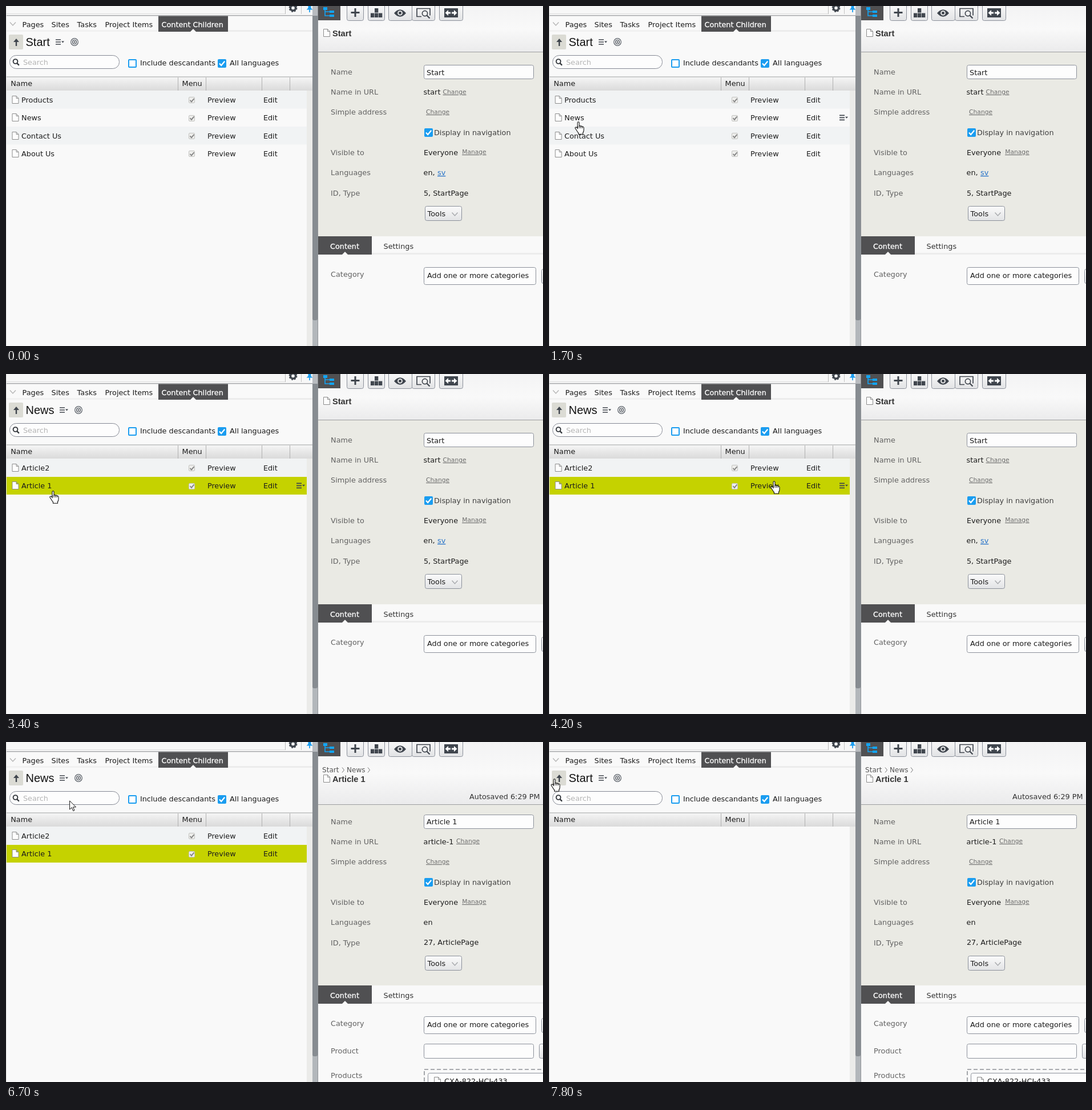
An HTML page for the animation above (8 s loop, 941 px wide and 595 px high).

```html
<!DOCTYPE html>
<html lang="en">
<head>
<meta charset="utf-8">
<title>Content children</title>
<style>
html, body { margin: 0; width: 100%; height: 100%; overflow: hidden; background: #f9f9f9; }
svg { display: block; }
text { font: 12.8px "DejaVu Sans", Verdana, sans-serif; white-space: pre; }
.title { font: 20px "Liberation Sans", Arial, sans-serif; }
.head { font: bold 14.6px "Liberation Sans", Arial, sans-serif; }
.crumb { font-size: 12px; }
.link { font-size: 10.7px; text-decoration: underline; }
.on { stroke: #fff; stroke-width: .3px; }
</style>
</head>
<body>
<svg id="stage" width="941" height="595" viewBox="0 0 941 595">
<defs>
  <linearGradient id="bar" x2="0" y2="1"><stop stop-color="#f6f6f6"/><stop offset="1" stop-color="#dadada"/></linearGradient>
  <linearGradient id="top" x2="0" y2="1"><stop stop-color="#f3f3f4"/><stop offset=".5" stop-color="#f9f9f9"/><stop offset="1" stop-color="#ebebec"/></linearGradient>
  <linearGradient id="btn" x2="0" y2="1"><stop stop-color="#fbfbfb"/><stop offset="1" stop-color="#e2e3e5"/></linearGradient>
</defs>
</svg>
<script>
const LOOP = 8000, STEP = 100, ROW = 31.35, LIST_TOP = 148.3;
const INK = '#1c1c1c', LABEL = '#626262', DARK = '#505052', ICON = '#40464e', BLUE = '#1b9df0';
const stage = document.getElementById('stage');

const rect = (x, y, w, h, fill, more = '') =>
  `<rect x="${x}" y="${y}" width="${w}" height="${h}" fill="${fill}" ${more}/>`;
const path = (d, stroke, width = 1, fill = 'none') =>
  `<path d="${d}" stroke="${stroke}" stroke-width="${width}" fill="${fill}"/>`;
const text = (x, y, str, fill = INK, cls = '') =>
  `<text x="${x - .4}" y="${Math.round(y)}" fill="${fill}" class="${cls}">${str}</text>`;
const group = (id, body, more = '') => `<g id="${id}" ${more}>${body}</g>`;
const box = (x, y, w, h, fill = '#fdfdfd') =>
  rect(x + .5, y + .5, w - 1, h - 1, fill, 'rx="3" stroke="#8b909a"');
const link = (x, y, str) => text(x, y, str, '#6c6c6c', 'link');

const page = (x, y) => path(`M${x + .5} ${y + .5}h7l4 4v9h-11zm7 0v4h4`, '#8c8c8c', 1, '#fdfdfd');
const menuIcon = (x, y) =>
  path(`M${x} ${y - 4}h9m-9 4h9m-9 4h9`, ICON, 1.7) + path(`M${x + 10} ${y - 1.5}h5l-2.5 3z`, 'none', 0, ICON);
const checked = (x, y) =>
  rect(x, y, 15, 15, BLUE, 'rx="2"') + path(`M${x + 3} ${y + 7.5}l3.2 3.5 6-7.3`, '#fff', 2.2);
const tab = (x, y, w, h, str, tx) =>
  rect(x, y, w, h, DARK) +
  path(`M${x + w / 2 - 5} ${y + h}l5-5 5 5z`, 'none', 0, '#f9f9f9') +
  text(tx, y + h / 2 + 5.5, str, '#fff', 'on');
const chevron = (x, y, color) => path(`M${x - 5} ${y - 2.5}l5 5.5 5-5.5`, color, 1.5);

function listRow(name, i) {
  const y = LIST_TOP + i * ROW, base = y + 20.6;
  return (i % 2 ? '' : rect(1, y, 526, ROW, '#f1f3f4')) +
    group(`bg-${name.replace(/\W/g, '')}`, rect(1, 180, 526, 31, '#c5d200'), 'display="none"') +
    page(10.5, Math.round(y + 8.5)) + text(27.5, base, name) +
    rect(320.5, Math.round(y + 11) + .5, 10, 10, '#eeeeec', 'rx="1.5" stroke="#c3c3c0"') +
    path(`M322.5 ${y + 16.5}l2.5 2.8 4.5-5.5`, '#858585', 1.9) +
    text(353.3, base, 'Preview') + text(451.3, base, 'Edit');
}

function leftPanel() {
  let s = rect(0, 0, 547, 595, '#f9f9f9') + rect(0, 0, 537, 16, '#f7f7f7') +
    rect(0, 13, 489, 1, '#dedede') + rect(0, 16, 537, 1.4, '#a3a5a8') +
    rect(489, 0, 1, 14, '#b9b9b9') + rect(517, 0, 1, 14, '#c4c4c4') +
    '<circle cx="503" cy="3.5" r="4.5" fill="none" stroke="#40464e" stroke-width="3.4"/>' +
    '<circle cx="503" cy="3.5" r="6.4" fill="none" stroke="#40464e" stroke-width="2" stroke-dasharray="2.6 2.43"/>' +
    path('M529.5 0h5v3.5l3 3h-4.6v4.5h-1.8v-4.5h-4.6l3-3z', 'none', 0, BLUE);
  s += rect(389, 42, 148, 3, '#ececec') + rect(0, 42, 267, 3, '#f1f1f1') + chevron(12, 31, '#b8b8b8');
  [[29, 'Pages'], [80, 'Sites'], [125, 'Tasks'], [174, 'Project Items']].forEach(([x, n]) => s += text(x, 36.5, n));
  s += tab(267, 17.5, 122, 27.5, 'Content Children', 273);
  s += rect(5, 50, 25, 26, '#dbdbd4', 'rx="2"') +
    path('M18 70v-9', ICON, 2.4) + path('M13 63l5-6 5 6z', 'none', 0, ICON) +
    '<text id="title" class="title" x="34.5" y="70" fill="#111"></text>' +
    group('tools', menuIcon(87, 63) +
      '<circle cx="120" cy="63" r="6.3" fill="none" stroke="#555b63" stroke-width="1.2"/>' +
      '<circle cx="120" cy="63" r="3.4" fill="none" stroke="#555b63" stroke-width="1.4"/>' +
      '<circle cx="120" cy="63" r="1.3" fill="#40464e"/>');
  s += rect(6.5, 86.5, 192, 23, '#fdfdfd', 'rx="11.2" stroke="#858994"') +
    '<circle cx="16.5" cy="97" r="3.9" fill="none" stroke="#33373c" stroke-width="1.9"/>' +
    path('M19.3 100l3.5 3.8', '#33373c', 2.4) + text(30.3, 103, 'Search', '#b4b4b4');
  s += rect(215, 94, 13, 13, '#fff', `stroke="${BLUE}" stroke-width="2" rx="1"`) + checked(371, 93) +
    text(235.3, 104, 'Include descandants') + text(392.5, 104, 'All languages');
  s += rect(527, 148, 10, 447, '#ebebe9') + rect(1, 124, 536, 24, 'url(#bar)') + rect(0, 123.5, 537, 1, '#a0a1a2');
  [301, 350, 448, 497].forEach(x => s += rect(x, 125, 1, 23, '#b0b0b0'));
  s += text(8.7, 140, 'Name') + text(309, 140, 'Menu');
  s += group('rootList', ['Products', 'News', 'Contact Us', 'About Us'].map(listRow).join('')) +
    group('newsList', ['Article2', 'Article 1'].map(listRow).join('')) +
    group('rowMenu', menuIcon(509, 164));
  return s + rect(0, 0, 1, 595, '#dcdcdc') + rect(537, 0, 10, 595, '#b3b7bb') +
    rect(537, 10, 9, 540, '#878c91', 'rx="3"') + rect(537, 0, 10, 17, '#b9bcc0') + rect(546, 0, 1, 595, '#8f9397');
}

function toolbar() {
  let s = rect(547, 0, 39, 25, DARK) +
    path('M559 6v11h9M559 10h9', '#12a5f8', 1.6) +
    rect(556, 2, 7, 5, '#12a5f8') + rect(567, 8, 8, 4, '#12a5f8') + rect(567, 15, 8, 4, '#12a5f8');
  [[597, 30], [634, 30], [670, 42], [711, 41], [759, 42]].forEach(([x, w]) => s += box(x, -6, w, 32, 'url(#btn)'));
  s += path('M612 4v15M604.5 11.5h15', ICON, 3);
  [[646, 4], [639, 12.5], [646, 12.5], [653, 12.5]].forEach(([x, y]) => s += rect(x, y, 6.3, 7.5, ICON));
  s += path('M680 12.5q10.5-12.5 21 0q-10.5 12.5-21 0z', 'none', 0, ICON) +
    '<circle cx="690.5" cy="12.3" r="4.3" fill="#f1f1f1"/><circle cx="690.5" cy="12.3" r="2.5" fill="#40464e"/>' +
    path('M728 18.5h-8v-14h23v12', ICON, 1.7) +
    '<circle cx="734" cy="13" r="4.6" fill="#f2f2f2" stroke="#40464e" stroke-width="1.7"/>' +
    path('M737.5 16.5l5 5', ICON, 2.2) +
    rect(768, 4, 24, 16, ICON) + path('M769.5 12l5.5-5v3.5h10v-3.5l5.5 5-5.5 5v-3.5h-10v3.5z', 'none', 0, '#fff') +
    rect(779, 4, 2, 16, ICON);
  return s;
}

function rightPanel() {
  let form = rect(547, 40, 394, 363, '#eaeae4');
  [['Name', 120], ['Name in URL', 155], ['Simple address', 190], ['Visible to', 261], ['Languages', 296],
    ['ID, Type', 332]].forEach(([n, y]) => form += text(569.5, y, n, LABEL));
  form += box(732, 103, 193, 25) + link(736.5, 189, 'Change') + checked(733, 214) +
    text(750.4, 226, 'Display in navigation', '#3f3f3f') + text(732.3, 261, 'Everyone') + link(799.6, 259, 'Manage') +
    box(734, 350, 65, 26, 'url(#btn)') + text(739, 368, 'Tools') + chevron(786.5, 364, '#a9abae');
  const tabs = rect(547, 403, 394, 192, '#f9f9f9') + rect(641, 432, 300, 3, '#ececec') +
    tab(547, 403, 94, 32, 'Content', 568.4) + text(662, 425, 'Settings', '#333') +
    text(569.5, 474, 'Category', LABEL) +
    box(732, 457, 197, 31) + text(738.4, 476, 'Add one or more categories') + box(938, 460, 30, 26, 'url(#btn)');
  const home = text(737.5, 121, 'Start') + text(732, 155, 'start') + link(766, 154, 'Change') +
    text(732, 296, 'en, ') + text(756.5, 296, '<tspan text-decoration="underline">sv</tspan>', '#2672c8') +
    text(732.3, 332, '5, StartPage');
  const article = text(737.5, 144, 'Article 1') + text(732, 179, 'article-1') + link(789.5, 177, 'Change') +
    text(732, 320, 'en') + text(732.3, 355, '27, ArticlePage') +
    text(569.5, 545, 'Product', LABEL) + box(732, 528, 193, 26) + box(934, 528, 30, 26, 'url(#btn)') +
    text(569.5, 588, 'Products', LABEL) +
    group('items', rect(733, 573, 230, 50, 'none', 'stroke="#8e9196" stroke-width="1.6" stroke-dasharray="7 4"') +
      box(739, 579, 220, 40) + page(750, 586) + text(768.4, 598, 'CXA-822-HCJ-433'));
  const crumbs = text(554.5, 53, 'Start', '#555', 'crumb') + path('M589 44.5l3.5 4.5-3.5 4.5M634 44.5l3.5 4.5-3.5 4.5', '#777') +
    text(597.5, 53, 'News', '#555', 'crumb') + text(812.5, 100, 'Autosaved 6:29 PM', '#333');
  return rect(547, 0, 394, 595, '#f9f9f9') + group('form', form) + group('tabs', tabs) +
    group('home', home) + group('article', article) +
    rect(547, 0, 394, 80, 'url(#top)', 'id="header"') + rect(547, 80, 394, 1, '#9c9d9f', 'id="headLine"') +
    group('crumbs', crumbs) +
    group('name', page(556, 40) + '<text id="head" class="head" x="572" y="53" fill="#333"></text>') + toolbar();
}

const arrow = path('M.6 .9V16l3.6-3.4 2.6 6 2.2-1-2.5-5.7h5z', '#111', 1, '#fff');
const hand = path('M5 2.5Q5 .8 6.5 .8T8 2.5V8Q9.5 7 10.6 8.5 12 7.6 13.2 9.2 16 8.8 16 11.5V15Q16 18 14.5 19.5V22.3H6.5V20Q5 18.5 3 15L.9 11.8Q.6 10.2 2.2 10 3.5 10 5 12.2z', '#111', 1.1, '#fff') +
  path('M5 12V8M8 8v4M10.7 8.8v3.2M13.3 9.5v2.5', '#111', 1);

stage.innerHTML += leftPanel() + rightPanel() +
  group('cursor', group('arrow', arrow) + group('hand', hand));

// Pointer stops: time, x, y
const stops = [
  [100, 611, 105], [300, 611, 105], [700, 295, 228], [1100, 295, 228], [1700, 45, 202], [2400, 45, 202],
  [2500, 44, 198], [3000, 44, 198], [3200, 46, 198], [3300, 46, 198], [3600, 160, 220], [3900, 300, 192],
  [4100, 300, 192], [4200, 388, 187], [4300, 429, 190], [4500, 429, 190], [4900, 453, 193], [5800, 453, 193],
  [6000, 439, 193], [6600, 439, 193], [6700, 111, 102], [7500, 2, 64], [7600, 3, 64], [8000, 3, 64]
];
function pointer(t) {
  const i = Math.max(1, stops.findIndex(s => s[0] >= t));
  const [t0, x0, y0] = stops[i - 1], [t1, x1, y1] = stops[i];
  const p = Math.max(0, (t - t0) / (t1 - t0)), e = p * p * (3 - 2 * p);
  return [Math.round(x0 + (x1 - x0) * e), Math.round(y0 + (y1 - y0) * e)];
}

const el = id => document.getElementById(id);
const show = (id, on) => el(id).setAttribute('display', on ? 'inline' : 'none');
const move = (id, x, y) => el(id).setAttribute('transform', `translate(${x} ${y})`);

function render(time) {
  const t = Math.floor(time % LOOP / STEP) * STEP;
  const inNews = t >= 2200 && t < 7800, loaded = t >= 5600;
  const rows = t < 2200 ? 4 : inNews ? 2 : 0;

  el('title').textContent = inNews ? 'News' : 'Start';
  move('tools', inNews ? 7 : 0, 0);
  show('rootList', t < 2200);
  show('newsList', inNews);
  show('bg-Article1', t >= 3400);

  move('form', 0, loaded ? 24 : 0);
  move('tabs', 0, loaded ? 23 : 0);
  show('home', !loaded);
  show('article', loaded);
  show('items', t >= 5900);
  show('crumbs', loaded);
  el('header').setAttribute('height', loaded ? 109 : 80);
  el('headLine').setAttribute('y', loaded ? 109 : 80);
  el('head').textContent = t < 5500 ? 'Start' : 'Article 1';
  move('name', 0, loaded ? 17 : 0);

  const [x, y] = pointer(t), row = Math.floor((y - LIST_TOP) / ROW);
  const isHand = t >= 1500 && t < 6700 || t >= 7400;
  show('cursor', t >= 100);
  show('hand', isHand);
  show('arrow', !isHand);
  move('cursor', x, y);
  show('rowMenu', t >= 100 && x < 527 && row >= 0 && row < rows);
  move('rowMenu', 0, row * ROW);
}

function tick() {
  render(performance.now());
  requestAnimationFrame(tick);
}
tick();
</script>
</body>
</html>
```
